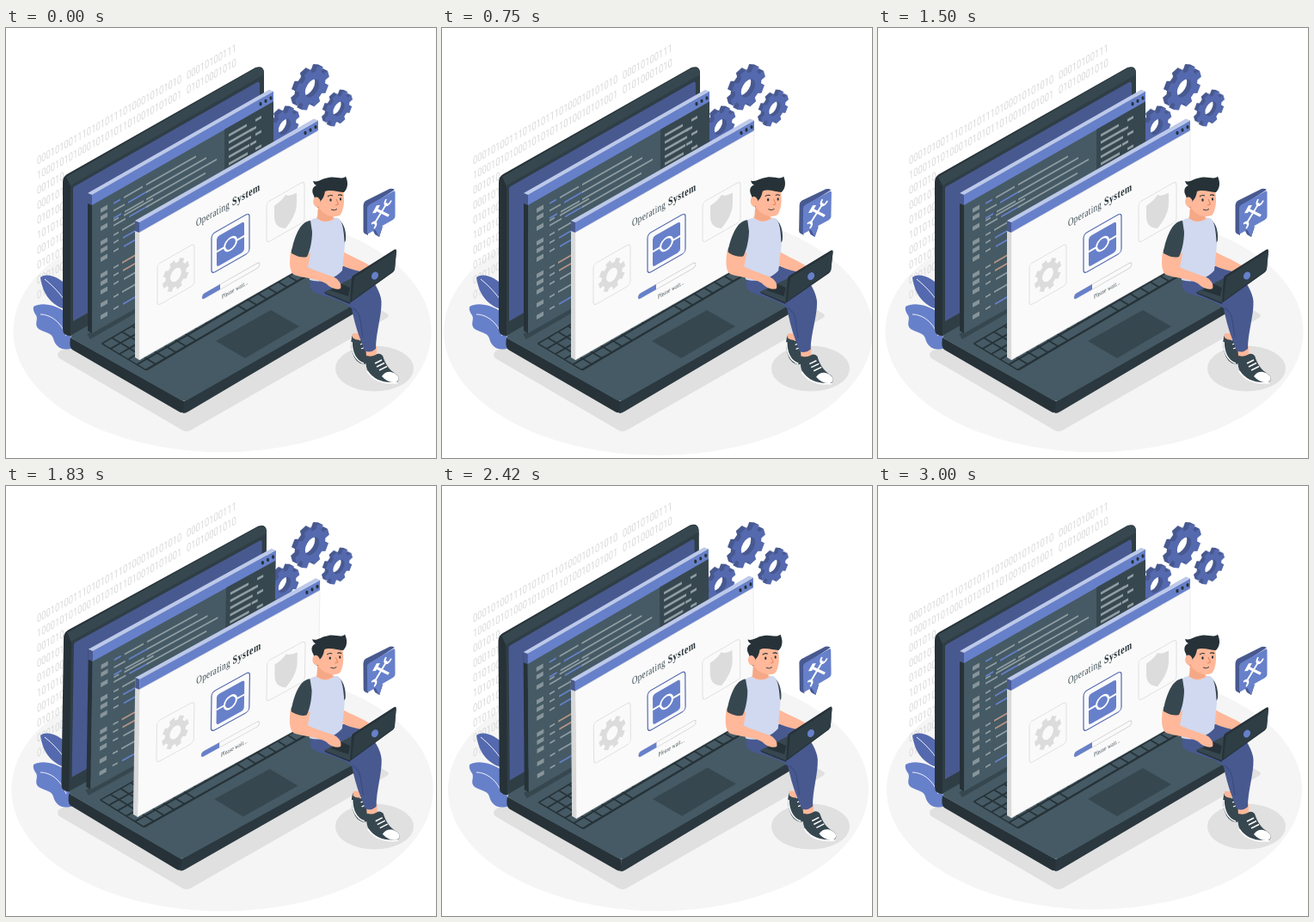
Recreate the animation shown at these times as an HTML page with a canvas. Size 500 by 500 pixels, loop 3040 ms.

```html
<!DOCTYPE html>
<html lang="en">
<head>
<meta charset="utf-8">
<title>Operating System</title>
<style>
html, body { margin: 0; width: 100%; height: 100%; overflow: hidden; background: #fff; }
canvas { display: block; width: 500px; height: 500px; }
</style>
</head>
<body>
<canvas id="stage"></canvas>
<script>
const LOOP = 3040;
const SLOPE = 0.57;
const BLUE = '#6780ca', PALE = '#bcc9ea', NAVY = '#485990', MID = '#5469ae';
const INK = '#263238', SLATE = '#37474f', STEEL = '#455a64';
const FOG = '#e0e0e0', SKIN = '#ffb899';

const canvas = document.getElementById('stage');
const ctx = canvas.getContext('2d');
const dpr = window.devicePixelRatio || 1;
canvas.width = canvas.height = 500 * dpr;

// ---- helpers ----
function shape(d, fill, line, width = 1) {
  const p = new Path2D(d);
  if (fill) { ctx.fillStyle = fill; ctx.fill(p); }
  if (line) { ctx.strokeStyle = line; ctx.lineWidth = width; ctx.stroke(p); }
}

function oval(x, y, rx, ry, fill, turn = 0) {
  ctx.beginPath();
  ctx.ellipse(x, y, rx, ry, turn, 0, 7);
  ctx.fillStyle = fill;
  ctx.fill();
}

// Runs draw() on the upright plane that rises to the right.
function onPlane(x, y, k, draw) {
  ctx.save();
  ctx.transform(k, -k * SLOPE, 0, 1, x, y);
  draw();
  ctx.restore();
}

function slab(x, y, w, h, fill, r = 0, line, width = 1) {
  onPlane(x, y, 1, () => {
    ctx.beginPath();
    ctx.roundRect(0, 0, w, h, r);
    if (fill) { ctx.fillStyle = fill; ctx.fill(); }
    if (line) { ctx.strokeStyle = line; ctx.lineWidth = width; ctx.stroke(); }
  });
}

function label(text, x, y, font, fill, gap = '0px') {
  onPlane(x, y, 0.72, () => {
    ctx.font = font;
    ctx.letterSpacing = gap;
    ctx.fillStyle = fill;
    ctx.fillText(text, 0, 0);
  });
}

function spin(deg, x, y, draw) {
  ctx.save();
  ctx.translate(x, y);
  ctx.rotate(deg * Math.PI / 180);
  ctx.translate(-x, -y);
  draw();
  ctx.restore();
}

function gear(x, y, r, front, side, depth) {
  const p = new Path2D();
  const step = Math.PI / 4;
  for (let i = 0; i < 8; i++) {
    [[-0.32, 0.77], [-0.24, 1], [0.24, 1], [0.32, 0.77]].forEach(([a, k]) => {
      const q = (i + a) * step + 0.5;
      p.lineTo(r * k * Math.cos(q), r * k * Math.sin(q));
    });
  }
  p.closePath();
  p.moveTo(r * 0.41, 0);
  p.arc(0, 0, r * 0.41, 0, 7);
  for (let d = depth; d >= 0; d--) {
    onPlane(x - d, y - d / 2, 0.87, () => {
      ctx.fillStyle = d ? side : front;
      ctx.fill(p, 'evenodd');
    });
  }
}

// ---- timing ----
function sway(t, period) {
  const p = t % period / period;
  if (p < 0.25) return 4 * p;
  return p < 0.75 ? 2 - 4 * p : 4 * p - 4;
}

function beat(t) {
  if (t > 2900) return 0;
  const p = (t + 25) % 1500 / 1500;
  if (p < 0.28) return 1 - Math.abs(p / 0.14 - 1);
  if (p < 0.42) return (p - 0.28) / 0.14;
  return Math.max(0, (0.7 - p) / 0.28);
}

// ---- scenery ----
const BITS = ['00010100111010101110100010101010', '10001010100010101011010010101001',
  '001010', '000101', '010100', '101010', '001010', '010101', '000100', '01011'];

function backdrop(t) {
  const s = 1 + 0.05 * beat(t);
  oval(251.5, 353, 241.5 * s, 139.4 * s, '#f5f5f5');
  const font = '13px Roboto, "Liberation Sans", sans-serif';
  BITS.forEach((row, i) => label(row, 36, 159 + i * 17.4, font, '#d9d9d9'));
  label('00010100111', 210, 60, font, '#d9d9d9');
  label('01010001010', 210, 77, font, '#d9d9d9');
  shape('M62 376Q58 380 62 384L204 467Q210 471 216 467L443 337Q447 334 443 332L300 250Z', FOG);
  oval(428.5, 396, 45.5, 26.5, FOG);
  gear(356, 70, 23, MID, NAVY, 5);
  gear(387, 94, 18.5, MID, NAVY, 4);
  gear(324, 115, 20, MID, NAVY, 5);
}

function plant() {
  shape('M40 290C47 284 62 289 72 301V328C55 324 43 312 40 290Z', MID);
  shape('M45 292C55 300 63 309 70 319', null, '#fff', 0.9);
  shape('M32 324C42 318 60 323 70 331L78 372C66 376 58 372 55 361C53 354 46 355 38 350C32 345 38 339 35 334Q31 329 32 324Z', BLUE);
  shape('M40 333C52 333 64 342 70 358', null, '#fff', 0.9);
}

// ---- big laptop ----
function shell() {
  shape('M66 179Q66 173 71 170L290 46Q299 43 300 51V236L75 358Q66 358 66 350Z', INK);
  shape('M70 173L290 47Q300 44 300 53V60L75 184Z', SLATE);
  shape('M75 183L300 54V236L75 358Z', '#2f3e45');
  shape('M78 187Q78 185 80 184L292 63Q295 61 295 66V217L78 341Z', NAVY);

  shape('M75 360L207 434V447Q204 448 201 446L77 374Q73 371 75 360Z', INK);
  shape('M207 434L408 318V330L212 446Q209 448 206 448Z', '#2b383f');
  shape('M78 362Q73 359 78 356L276 242L406 315Q411 318 406 321L212 432Q207 435 202 432Z', STEEL);
  shape('M96 359L280 253', null, SLATE, 7);

  ctx.save();
  ctx.transform(1, -0.585, 1, 0.6, 110, 367);
  ctx.fillStyle = INK;
  ctx.beginPath();
  ctx.roundRect(0, 0, 190, 53, 2);
  ctx.fill();
  ctx.fillStyle = STEEL;
  for (let r = 0; r < 5; r++) {
    for (let c = 0; c < 16; c++) {
      if (r == 4 && c > 4 && c < 10) continue;
      ctx.fillRect(1.5 + c * 11.75, 1.5 + r * 10.2, 10, 8.4);
    }
  }
  ctx.fillRect(60.25, 42.3, 57, 8.4);
  ctx.restore();
  shape('M244 364L308 328L341 347L278 384Z', SLATE);
}

function pane(x, y, w, h, front, side) {
  const top = y - w * SLOPE;
  shape(`M${x - 5} ${y - 2}L${x} ${y}V${y + h}L${x - 5} ${y + h - 3}Z`, side);
  slab(x, y, w, h, front);
  shape(`M${x - 5} ${y - 2}L${x} ${y}V${y + 12}L${x - 5} ${y + 10}Z`, NAVY);
  slab(x, y, w, 12, BLUE);
  shape(`M${x - 5} ${y - 2}L${x + w - 5} ${top - 2}L${x + w} ${top}L${x} ${y}Z`, PALE);
  for (let i = 0; i < 3; i++) {
    const dx = w - 15 + i * 6;
    oval(x + dx, y - dx * SLOPE + 6, 1.6, 2.2, INK);
  }
}

function codePane() {
  const grey = '#909da3', rust = '#b89586';
  const tints = [rust, grey, BLUE];
  pane(100, 194, 211, 161, STEEL, INK);
  slab(254, 118, 57, 110, SLATE);
  [210, 219, 231, 248, 257, 267, 286, 295, 305, 320, 334].forEach((y, i) => {
    slab(110, y, 8, 5, '#87949a');
    if (i < 2) return;
    slab(125, y - 8, 6, 2, grey);
    slab(135 + i % 3, y - 14, 34, 2, tints[(i >> 1) % 3]);
  });
  for (let i = 0; i < 4; i++) {
    const y = 203 + i * 8.6;
    const first = 8 + i * 5 % 9;
    slab(125, y, first, 2, i % 2 ? grey : BLUE);
    slab(129 + first, y - (4 + first) * SLOPE, 22, 2, i % 2 ? BLUE : grey);
    slab(163, y - 38 * SLOPE, 58 + i * 37 % 25, 2, grey);
  }
  for (let i = 0; i < 5; i++) {
    slab(259, 123.5 + i * 8.3, 21 + i * 7 % 9, 3, grey);
    slab(290 - i % 2 * 6, 106 + i * 8.3 + i % 2 * 3.4, 7, 3, grey);
  }
}

function setupPane() {
  pane(155, 226, 208, 160, '#fafafa', '#d8d8d8');
  slab(155, 238, 208, 148, null, 0, '#e6e6e6', 0.6);
  label('Operating', 221, 231, '12.5px "Liberation Serif", serif', SLATE, '0.5px');
  label('System', 263, 207, 'bold 13.5px "Liberation Serif", serif', INK, '0.7px');

  slab(176, 275, 43, 48, '#fafafa', 4, FOG);
  gear(197.5, 287, 18, '#dcdcdc', null, 0);
  slab(303, 203, 44, 47, '#fafafa', 4, FOG);
  onPlane(325, 213, 1, () =>
    shape('M-13 -14Q-5 -14 0 -19Q5 -14 13 -14V-2C13 10 6 16 0 20C-6 16 -13 10 -13 -2Z', '#dcdcdc'));

  slab(239, 240, 44, 46, '#fafafa', 4, MID, 1.2);
  slab(245, 243, 32, 35, BLUE, 3);
  onPlane(261, 251, 1, () => {
    shape('M-16 0H16', null, '#fff', 2.2);
    ctx.beginPath();
    ctx.arc(0, 0, 7, 0, 7);
    ctx.fillStyle = BLUE;
    ctx.fill();
    ctx.strokeStyle = '#fff';
    ctx.lineWidth = 2.2;
    ctx.stroke();
  });

  slab(228, 310, 67, 6, '#fafafa', 3, '#d0d0d0', 0.8);
  slab(228, 310, 21, 6, BLUE, [3, 0, 0, 3]);
  label('Please wait...', 251, 315, '7.5px "Liberation Serif", serif', SLATE, '0.2px');
}

// ---- person ----
function shoes() {
  shape('M403 357C400 364 401 374 405 383C409 390 415 392 420 390L421 376L412 357Z', SLATE);
  shape('M402 365C402 376 406 387 416 390', null, '#fff', 1.6);
  shape('M411 363L415 361M412 368L417 366M413 373L418 371', null, '#fff', 1.3);
  shape('M403 355H413L414 362Q407 364 403 360Z', SKIN);
  shape('M418 370H431V382Q424 386 419 381Z', SKIN);
  shape('M420 381C417 390 419 398 424 404C432 412 444 414 453 413C458 411 458 405 453 402C446 398 441 391 438 381Q434 377 430 380Q424 383 420 381Z', SLATE);
  shape('M437 405Q441 399 448 400C458 403 459 410 453 412Q444 413 437 405Z', '#fff');
  shape('M420 399C428 411 442 414 455 412.5', null, '#fff', 1.8);
  shape('M429 390L437 386M431 394L440 389.5M434 398L443 393.5', null, '#fff', 1.5);
}

function head() {
  shape('M363 207L380 212V222Q371 228 362 221Z', '#f5a886');
  shape('M363 190L391 186C394 195 394 209 389 217C384 221 373 219 367 213L363 208Z', SKIN);
  shape('M363 209C358 206 361 200 357 193C355 187 358 184 361 183Q358 182 357 178C363 180 367 175 375 174C384 172 391 177 395 172.5C398 179 398 186 393 191C387 191 377 187 371 190C370 195 369 198 366 201Z', INK);
  oval(361.5, 202.5, 4.3, 6, SKIN, -0.2);
  oval(377.5, 200, 1.2, 1.7, INK);
  oval(389, 199, 1.1, 1.7, INK);
  shape('M374 196Q377 193.5 380 195M386 194.5Q389 193 391 195', null, INK, 1.1);
  shape('M384 199L386.5 205L383 206', null, '#e8835f', 1);
  shape('M378 211Q382 213 385 210.5', null, INK, 0.9);
}

function person() {
  shoes();
  shape('M356 290C351 300 354 306 363 309C378 314 395 318 402 326C404 337 407 349 412 362L417 375Q423 379 430 373C430 354 437 335 436.5 318C436 308 428 294 418 284L394 276L372 286Z', NAVY);
  shape('M403 325C408 329 411 332 412 340L415 360', null, '#394a80', 1);
  shape('M392 260C402 266 414 270 424 277L412 283C403 281 396 279 389 275Z', SKIN);
  shape('M384 221C392 224 396 235 395 247L391 254L386 240Z', SLATE);
  shape('M353 225C360 218 376 221 386 221C393 225 393 243 394 252L391 282C382 292 367 297 353 293L350 270Z', '#d0d9f0');
  shape('M363 218Q371 226 381 219L382 222Q371 229 361 221Z', SKIN);
  shape('M331 260C329 274 330 284 335 287C346 291 361 291 372 297C378 303 385 305 389 303C391 298 386 291 379 289C369 285 358 282 351 278L354 262Z', SKIN);
  shape('M354 224C343 225 337 239 333 255Q330 262 334 263Q343 268 350 266C354 258 356 246 356 237Z', SLATE);
  head();
  shape('M370 307L402 291L405 316L400 319Z', SLATE);
  shape('M370 307L400 319V321L371 309Z', INK);
  shape('M377 305L391 298L400 302L398 312Z', INK);
  shape('M402 290Q403 288 405 287L451 258Q454 256 454 259L452 280Q452 282 450 284L401 319Q399 320 400 317Z', INK);
  shape('M405 290L454 259L452 281L402 317Z', '#2f3e45');
  oval(429, 288, 3.8, 4.7, BLUE, 0.5);
  shape('M373 297C378 303 385 305 389 303C391 298 386 291 379 289Z', SKIN);
}

function bubble() {
  shape('M415.5 206Q415.5 203 418 201L446 187Q449 186 452 188L421 208V241L417 239Q415.5 238 415.5 236Z', NAVY);
  shape('M426 234L429 240L434 243L438 231Z', NAVY);
  slab(420, 207, 32.5, 33, BLUE, 2.5);
  shape('M429 234L434 243L438 229Z', BLUE);
  onPlane(436, 214.5, 1, () => {
    shape('M-8 9L7 -7M-6 -7L9 9', null, '#fff', 2.5);
    shape('M-10 -5L-5 -11L-1 -9L-6 -3Z', '#fff');
    shape('M6 -12Q3 -8 6 -5Q9 -3 12 -7M-11 7Q-7 6 -6 9Q-5 12 -8 14', null, '#fff', 2.2);
  });
}

function draw(t) {
  ctx.setTransform(dpr, 0, 0, dpr, 0, 0);
  ctx.fillStyle = '#fff';
  ctx.fillRect(0, 0, 500, 500);
  ctx.lineCap = 'butt';
  ctx.lineJoin = 'round';
  backdrop(t);
  plant();
  spin(sway(t, 1500), 237, 246, () => {
    shell();
    codePane();
    setupPane();
  });
  const lean = sway(t, 3000);
  spin(lean, 393, 294, person);
  spin(lean, 434, 214, bubble);
}

const start = performance.now();
function tick() {
  draw((performance.now() - start) % LOOP);
  requestAnimationFrame(tick);
}
tick();
</script>
</body>
</html>
```
